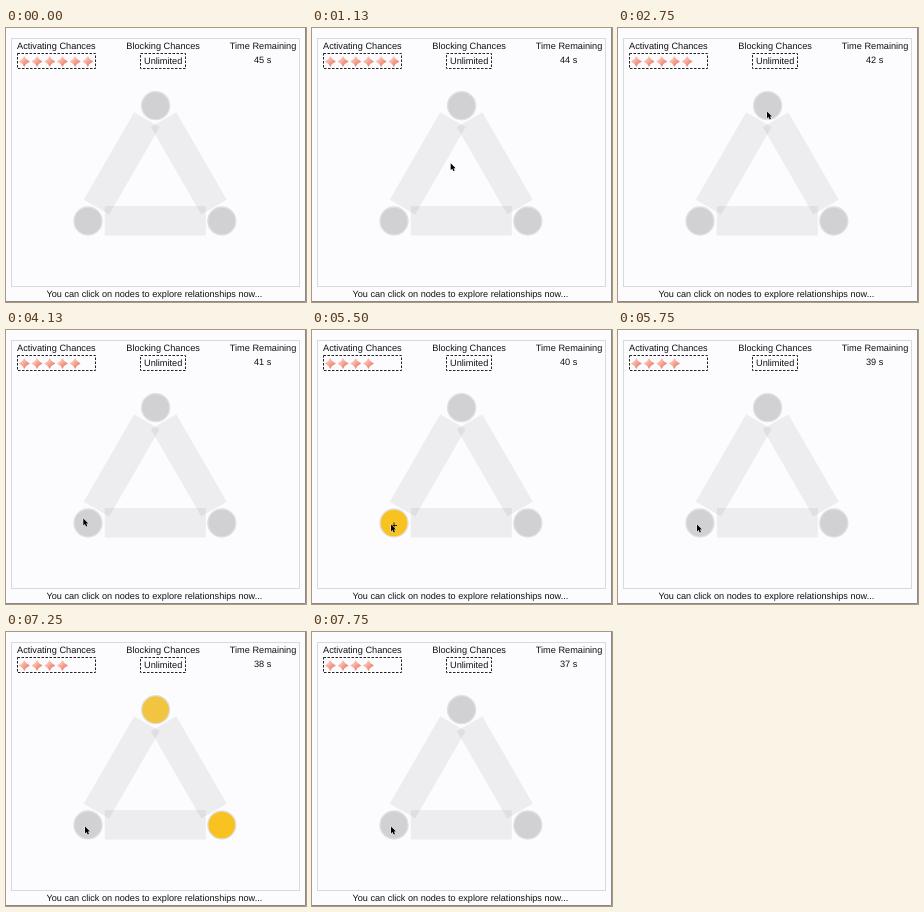
Recreate the animation shown at these times as an HTML page. Size 300x274 px, loop 8000 ms.

```html
<!DOCTYPE html>
<html lang="en">
<head>
<meta charset="utf-8">
<title>Explore relationships</title>
<style>
html, body { margin: 0; width: 100%; height: 100%; overflow: hidden; background: #fcfbfe; }
svg { display: block; width: 300px; height: 274px; }
text { font: 9.2px "Liberation Sans", Arial, sans-serif; fill: #111; text-rendering: geometricPrecision; }
.hint { font-size: 9.15px; }
.frame { fill: none; stroke: #d9d8db; }
.edge { fill: none; stroke: #888; }
.slot { fill: none; stroke: #222; stroke-dasharray: 2.5 1.5; }
.links { fill: #000; fill-opacity: .058; }
.nodes circle { stroke: #e0dfe3; stroke-width: 1.3; }
.plus { stroke: #222; stroke-width: 1; fill: none; }
.cursor { fill: #000; stroke: #fff; stroke-width: .7; paint-order: stroke; }
</style>
</head>
<body>
<svg viewBox="0 0 300 274">
  <defs>
    <linearGradient id="coral" x1="0" y1="0" x2="1" y2="1">
      <stop offset=".2" stop-color="#fccfc3"/>
      <stop offset=".5" stop-color="#f6a593"/>
      <stop offset=".85" stop-color="#e67765"/>
    </linearGradient>
    <path id="star" d="M0-5.6Q1.6-1.6 5.6 0Q1.6 1.6 0 5.6Q-1.6 1.6-5.6 0Q-1.6-1.6 0-5.6Z" fill="url(#coral)"/>
    <rect id="link" x="-50.5" y="-14.75" width="101" height="29.5"/>
  </defs>
  <path class="edge" d="M0 273.5H299.5V0"/>
  <rect class="frame" x="5.5" y="10.5" width="288" height="248"/>
  <text x="11" y="21">Activating Chances</text>
  <text x="120.3" y="21">Blocking Chances</text>
  <text x="223.8" y="21">Time Remaining</text>
  <rect class="slot" x="11.5" y="25.5" width="78" height="15"/>
  <rect class="slot" x="134.5" y="25.5" width="45" height="15"/>
  <text x="138" y="36">Unlimited</text>
  <text id="clock" x="248" y="35">45 s</text>
  <g id="stars"></g>
  <g class="links">
    <use href="#link" transform="translate(115.7 135.3) rotate(-60)"/>
    <use href="#link" transform="translate(182.8 135.3) rotate(60)"/>
    <use href="#link" transform="translate(149.3 192.8)"/>
  </g>
  <g class="nodes" id="nodes"></g>
  <path class="plus" id="plus" d="M-3 0H3M0-3V3"/>
  <path class="cursor" id="cursor" d="M0 0V6.9L1.6 5.5 2.7 8 4 7.4 2.9 5H5Z"/>
  <text class="hint" x="40.5" y="269">You can click on nodes to explore relationships now...</text>
</svg>
<script>
const LOOP = 8000, STEP = 125;
const GREY = [209, 208, 211], GOLD = [255, 192, 0];
const $ = id => document.getElementById(id);

function add(parent, tag, attrs) {
  const el = document.createElementNS("http://www.w3.org/2000/svg", tag);
  for (const key in attrs) el.setAttribute(key, attrs[key]);
  return parent.appendChild(el);
}

const stars = Array.from({ length: 6 }, (_, i) =>
  add($("stars"), "use", { href: "#star", x: 18.3 + i * 12.7, y: 33.5 }));

// Each glow key is [time, amount of gold], held until the next key.
const nodes = [
  { x: 149.6, y: 77.7, glow: [[2125, .85], [2250, 1], [2375, 0], [7000, 1], [7250, .7], [7375, 0]] },
  { x: 82, y: 193, glow: [[5500, .85], [5625, 1], [5750, 0]] },
  { x: 215.8, y: 193, glow: [[7000, .9], [7125, 1], [7250, .85], [7375, 0]] }
];
for (const n of nodes) n.el = add($("nodes"), "circle", { cx: n.x, cy: n.y, r: 14 });

const clicks = [{ at: 2125, node: nodes[0] }, { at: 5500, node: nodes[1] }];

// Pointer moves: start, end, from, to
const moves = [
  [750, 1250, [14, 228], [147, 129]],
  [1375, 2000, [147, 129], [149, 83.4]],
  [3875, 4125, [149, 83.4], [77.3, 188.5]],
  [4125, 4375, [77.3, 188.5], [76, 195.5]],
  [4375, 4750, [76, 195.5], [79, 194.5]]
];

const held = (keys, t) => keys.reduce((v, [at, next]) => t >= at ? next : v, 0);
const easeOut = p => 1 - (1 - p) ** 2;

function pointerAt(t) {
  const [start, end, a, b] = moves.filter(m => t >= m[0]).pop();
  const p = easeOut(Math.min(1, (t - start) / (end - start)));
  return a.map((v, i) => v + (b[i] - v) * p);
}

function render(time) {
  const t = Math.floor(time / STEP) * STEP;
  $("clock").textContent = 45 - Math.floor((t + 250) / 1000) + " s";

  const left = 6 - clicks.filter(c => t >= c.at).length;
  stars.forEach((s, i) => s.style.display = i < left ? "" : "none");

  for (const n of nodes) {
    const k = held(n.glow, t);
    n.el.setAttribute("fill", `rgb(${GREY.map((v, i) => Math.round(v + (GOLD[i] - v) * k))})`);
  }

  const click = clicks.find(c => t >= c.at && t < c.at + 250);
  $("plus").style.display = click ? "" : "none";
  if (click) $("plus").setAttribute("transform", `translate(${click.node.x} ${click.node.y + 2.5})`);

  const visible = t >= 750;
  $("cursor").style.display = visible ? "" : "none";
  if (visible) $("cursor").setAttribute("transform", `translate(${pointerAt(t)})`);
}

const begin = performance.now();
function tick() {
  render((performance.now() - begin) % LOOP);
  requestAnimationFrame(tick);
}
tick();
</script>
</body>
</html>
```
